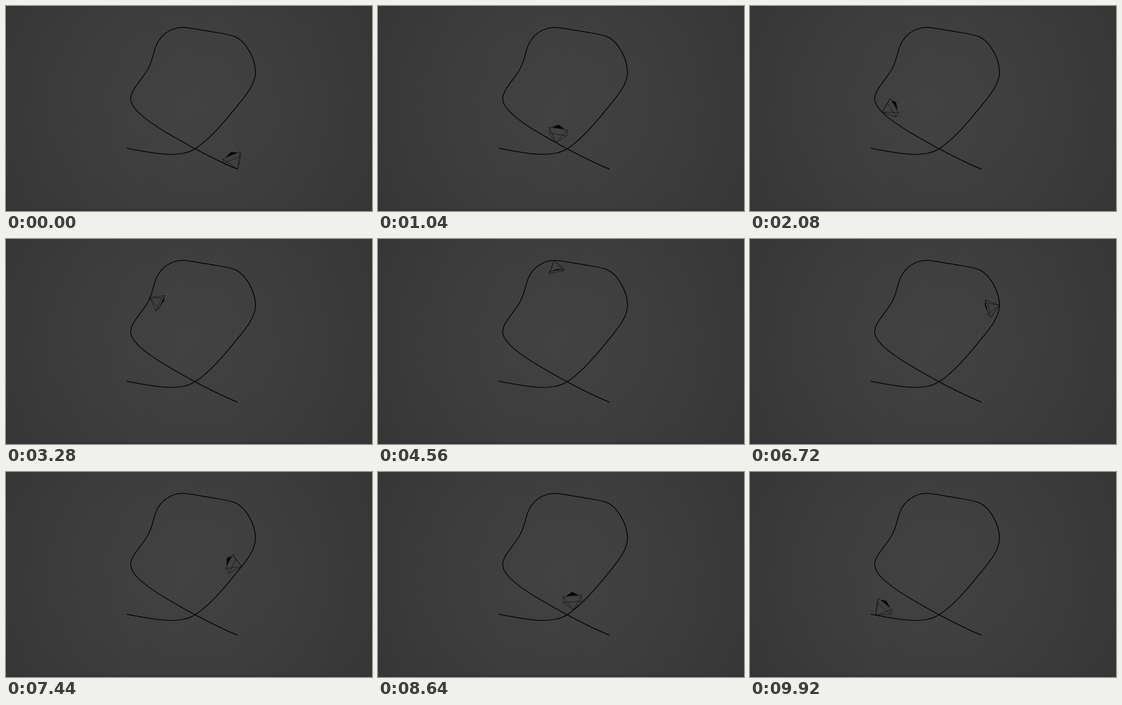
Write an HTML page that moves like this. It is 716x402 px and loops after 10000 ms.

```html
<!DOCTYPE html>
<html lang="en">
<head>
<meta charset="utf-8">
<title>Camera following a path</title>
<style>
  html, body { margin: 0; width: 100%; height: 100%; overflow: hidden; background: #393939; }
  svg { display: block; width: 716px; height: 402px; }
  path { fill: none; stroke: #000; }
</style>
</head>
<body>
<svg viewBox="0 0 716 402">
  <defs>
    <radialGradient id="glow" gradientUnits="userSpaceOnUse" cx="358" cy="195" r="410">
      <stop offset="0" stop-color="#424242"/>
      <stop offset=".45" stop-color="#3e3e3e"/>
      <stop offset="1" stop-color="#363636"/>
    </radialGradient>
  </defs>
  <rect width="716" height="402" fill="url(#glow)"/>
  <rect y="398" width="716" height="4" fill="#363436"/>
  <path id="aim" style="stroke:#4d4d70" stroke-opacity=".75" stroke-width=".8" stroke-dasharray="2 2"/>
  <path id="track" stroke-width="1.5" d="M453 320C426 309 398 295 370 280C332 259 290 236 266 215
    C252 203 244 192 244 182C244 163 268 143 279 121C291 97 288 80 303 62C314 49 330 42 346 42
    C358 42 380 47 400 50C420 53.5 434 55 445 59C467 66 488 101 488 130C488 155 466 179 445 205
    C425 230 398 262 370 280C355 289 340 291 320 291C294 291 264 284 236 279"/>
  <path id="wires" stroke-width=".75" stroke-opacity=".85" stroke-linejoin="round"/>
  <path id="marker" style="fill:#000;stroke:none"/>
</svg>
<script>
const LOOP = 10000, STEP = 80;
const TARGET = [371, 162];
const TARGET_DROP = 40, GROUND_Y = 148;   // target hangs below the track's plane
const [aim, track, wires, marker] =
  ['aim', 'track', 'wires', 'marker'].map(id => document.getElementById(id));

// Nearest distance along the track for a point on it
function distanceAt(x, y) {
  let best = 0, bestGap = Infinity;
  for (let s = 0, end = track.getTotalLength(); s <= end; s += 0.5) {
    const p = track.getPointAtLength(s), gap = Math.hypot(p.x - x, p.y - y);
    if (gap < bestGap) { bestGap = gap; best = s; }
  }
  return best;
}

// Waypoints: time, x, y
const keys = [
  [0, 453, 320], [1040, 348, 267], [2080, 259, 208], [3120, 276, 127],
  [4160, 311, 54], [4560, 345, 42], [5200, 402, 50.5], [5920, 462, 69],
  [6240, 478, 91], [7440, 461, 185], [8640, 383, 271], [9920, 246, 280.5]
].map(([t, x, y]) => ({ t, s: distanceAt(x, y) }));

const slope = (a, b) => (b.s - a.s) / (b.t - a.t);
keys.forEach((k, i) => {
  k.v = slope(keys[Math.max(i - 1, 0)], keys[Math.min(i + 1, keys.length - 1)]);
});

// Hermite interpolation of the travelled distance
function travelled(t) {
  const i = Math.max(1, keys.findIndex(k => k.t >= t));
  const a = keys[i - 1], b = keys[i], d = b.t - a.t, u = (t - a.t) / d;
  const ease = u * u * (3 - 2 * u);
  return a.s + (b.s - a.s) * ease + d * u * (1 - u) * ((1 - u) * a.v - u * b.v);
}

function drawCamera(x, y) {
  const tilt = 68 * Math.PI / 180 + (y - 201) / 994;
  const sinT = Math.sin(tilt), cosT = Math.cos(tilt);
  const dx = TARGET[0] - x, dy = (GROUND_Y - y) / 0.93, reach = Math.hypot(dx, dy);
  const hx = dx / reach, hy = dy / reach;
  const pitch = Math.atan2(TARGET_DROP, reach);
  const sinP = Math.sin(pitch), cosP = Math.cos(pitch);

  const forward = [hx * cosP, hy * cosP * sinT + sinP * cosT];
  const right = [-hy, hx * sinT];
  const up = [hx * sinP, hy * sinP * sinT - cosP * cosT];
  const half = 13.9 + 0.014 * y, depth = 1.52;

  // Point in the image plane, in units of half the frame width
  const at = (r, u) => [x, y].map((c, i) =>
    (c + half * (forward[i] * depth + right[i] * r + up[i] * u)).toFixed(2)).join(' ');

  const h = 0.5625;
  const corners = [at(-1, h), at(1, h), at(1, -h), at(-1, -h)];
  wires.setAttribute('d', `M${corners.join('L')}Z` + corners.map(c => `M${x} ${y}L${c}`).join(''));
  marker.setAttribute('d', `M${at(-0.7, h + 0.1)}L${at(0.7, h + 0.1)}L${at(0, h + 0.8)}Z`);
  aim.setAttribute('d', `M${x} ${y}L${TARGET}`);
}

function render() {
  const t = Math.floor(performance.now() % LOOP / STEP) * STEP;
  const p = track.getPointAtLength(travelled(t));
  drawCamera(p.x, p.y);
  requestAnimationFrame(render);
}
render();
</script>
</body>
</html>
```
